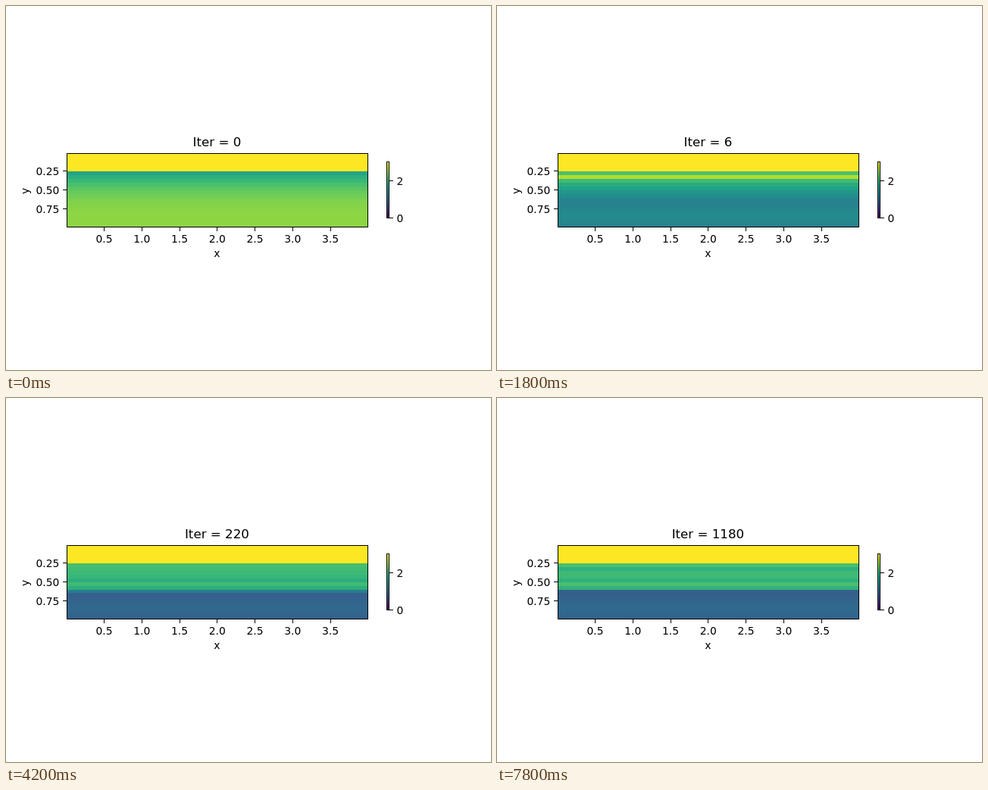
These frames come from a looping animation (640x480 px, 8 s). An HTML page:

```html
<!DOCTYPE html>
<html lang="en">
<head>
<meta charset="utf-8">
<title>Iteration plot</title>
<style>
  html, body { margin: 0; width: 100%; height: 100%; overflow: hidden; background: #fff; }
  svg { display: block; width: 640px; height: 480px; }
  text { font: 13.89px "DejaVu Sans", sans-serif; fill: #000; }
  #title { font-size: 16.67px; }
  rect { shape-rendering: crispEdges; }
  .frame { fill: none; stroke: #000; }
</style>
</head>
<body>
<svg id="plot" viewBox="0 0 640 480"></svg>
<script>
const plot = document.getElementById('plot');
const LOOP = 8000, STEP = 300, ROWS = 20, TOP_ROWS = 5;
const LOW_ROWS = ROWS - TOP_ROWS, MID = 278.4;

const viridis = ['440154', '482878', '3e4a89', '31688e', '26828e',
  '1f9e89', '35b779', '6dcd59', 'b4de2c', 'fde725']
  .map(hex => [0, 2, 4].map(i => parseInt(hex.slice(i, i + 2), 16)));

const mix = (a, b, k) => a + (b - a) * k;
const wave = (i, crest, period) => Math.cos(2 * Math.PI * (i - crest) / period);

function color(level) {
  const p = level * 9, i = Math.min(8, Math.floor(p));
  return `rgb(${viridis[i].map((c, j) => Math.round(mix(c, viridis[i + 1][j], p - i)))})`;
}

// The counter runs by ones, then tens, then eighties
function iterAt(step) {
  if (step <= 6) return step;
  return step <= 11 ? 10 * (step - 6) : 60 + 80 * (step - 12);
}

// Two layers with a soft edge, a bright line near the top and a wave in each layer
const stages = [
  { n: 4, upper: .8, lower: .44, edge: 3, soft: .6, peak: .14, ripple: 0, swell: .045 },
  { n: 6, upper: .68, lower: .45, edge: 4, soft: 1.5, peak: .23, ripple: 0, swell: .025 },
  { n: 40, upper: .63, lower: .3, edge: 7.5, soft: .5, peak: .19, ripple: .02, swell: .01 },
  { n: 540, upper: .67, lower: .32, edge: 6.5, soft: .1, peak: 0, ripple: .04, swell: .02 }
];

function stageAt(n) {
  const last = stages.length - 1;
  const i = Math.max(1, stages.findIndex(s => s.n >= n));
  const to = n >= stages[last].n ? last : i;
  const a = stages[to - 1], b = stages[to];
  const k = Math.min(1, Math.log(n / a.n) / Math.log(b.n / a.n));
  return Object.fromEntries(Object.keys(a).map(key => [key, mix(a[key], b[key], k)]));
}

function layered(n) {
  const s = stageAt(n);
  return i => {
    const top = 1 / (1 + Math.exp((i - s.edge) / s.soft));
    return mix(s.lower + s.swell * wave(i, 11.5, 9), s.upper + s.ripple * wave(i, 2.5, 2.6), top)
      + s.peak * Math.exp(-(((i - 1) / .8) ** 2));
  };
}

const smooth = n => i => .83 - .015 * n - .25 * (1 - i / (LOW_ROWS - 1)) ** 3;

function levelsAt(n) {
  const k = Math.min(1, Math.max(0, (n - 2) / 2));
  const early = smooth(n), late = layered(Math.max(4, n));
  return Array.from({ length: LOW_ROWS }, (_, i) => mix(early(i), late(i), k));
}

function add(tag, attrs, text = '') {
  const el = document.createElementNS('http://www.w3.org/2000/svg', tag);
  for (const key in attrs) el.setAttribute(key, attrs[key]);
  el.textContent = text;
  plot.append(el);
  return el;
}

const box = (x, y, width, height, fill) => add('rect', { x, y, width, height, fill });
const label = (x, y, anchor, text, extra) =>
  add('text', { x, y, 'text-anchor': anchor, ...extra }, text);
const outline = (x, y, width, height) => add('rect', { x, y, width, height, class: 'frame' });

// Heat map
const edge = k => Math.round(194.1 + 4.87 * k);
const rows = Array.from({ length: ROWS }, (_, k) =>
  box(80, edge(k), 397, edge(k + 1) - edge(k), color(1)));
outline(80.5, 194.5, 397, 97);

// Axes
for (let i = 0; i < 7; i++) {
  const x = 129 + 49.75 * i;
  box(Math.round(x), 292, 1, 5, '#000');
  label(x + .5, 312, 'middle', (.5 + i / 2).toFixed(1));
}
for (let i = 0; i < 3; i++) {
  const y = 217 + 25 * i;
  box(75, y, 5, 1, '#000');
  label(70.3, y + 6, 'end', (.25 + i / 4).toFixed(2));
}
label(MID, 331, 'middle', 'x');
label(0, 0, 'middle', 'y', { transform: 'translate(30 244) rotate(-90)' });

// Colour bar
for (let y = 205; y < 280; y++) box(502, y, 4, 1, color((279 - y) / 74));
outline(502.5, 205.5, 3, 74);
for (const v of [0, 2]) {
  const y = 279 - 24.5 * v;
  box(506, y, 5, 1, '#000');
  label(515.6, y + 6, 'start', v);
}

const title = label(MID, 185, 'middle', '', { id: 'title' });

let shown = -1;
function draw() {
  const step = Math.floor(performance.now() % LOOP / STEP);
  if (step !== shown) {
    shown = step;
    const n = iterAt(step);
    title.textContent = 'Iter = ' + n;
    levelsAt(n).forEach((v, i) => rows[TOP_ROWS + i].setAttribute('fill', color(v)));
  }
  requestAnimationFrame(draw);
}
draw();
</script>
</body>
</html>
```
